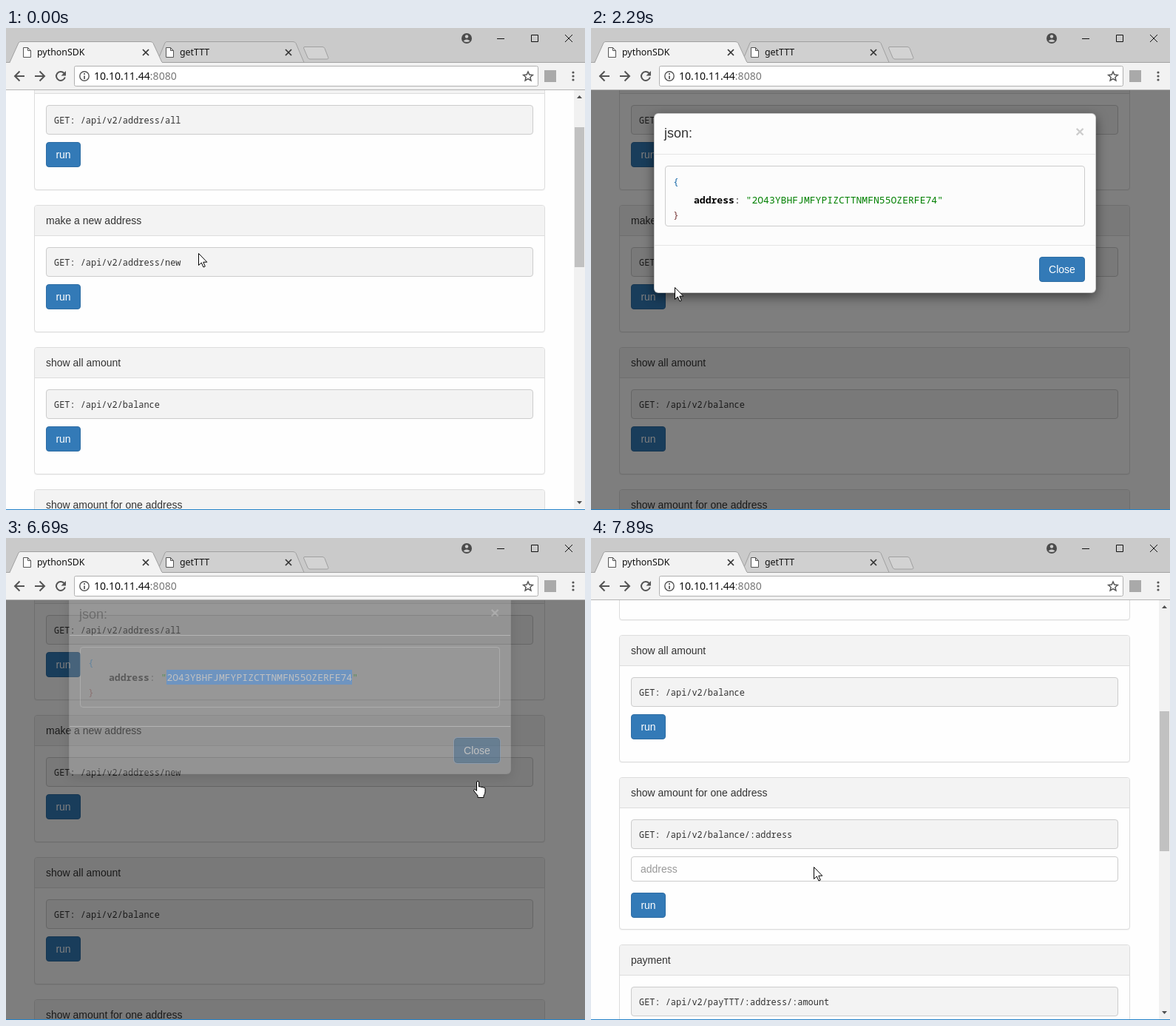
An HTML page for the animation above (8000 ms loop, 783 by 651 pixels).

```html
<!DOCTYPE html>
<html lang="en">
<head>
<meta charset="utf-8">
<title>API console</title>
<style>
* { box-sizing: border-box; }
html, body { margin: 0; width: 783px; height: 651px; overflow: hidden; background: #fefefe; }
body { position: relative; font: 14px/20px "Liberation Sans", Arial, sans-serif; color: #333; }
body > *, .card, .modal > * { position: absolute; }
#page { inset: 0; }
.card { left: 38px; width: 691px; border: 1px solid #ddd; border-radius: 4px; background: #fefefe;
  box-shadow: 0 1px 1px rgba(0,0,0,.05); padding: 0 15px; }
.card h4 { margin: 0 -15px 15px; padding: 10px 15px; height: 41px; font: inherit;
  background: #f3f3f3; border-bottom: 1px solid #ddd; border-radius: 3px 3px 0 0; }
.code { height: 40px; margin-bottom: 10px; padding-left: 10px; border: 1px solid #ccc; border-radius: 4px;
  background: #f3f3f3; font: 11.92px/38px "Noto Sans Mono", monospace; white-space: pre; }
.field { height: 34px; margin-bottom: 15px; padding: 6px 12px; border: 1px solid #ccc; border-radius: 4px; color: #999; }
.btn { width: 47px; height: 34px; line-height: 32px; text-align: center; color: #fff;
  background: #337ab7; border: 1px solid #2e6da4; border-radius: 4px; }
.btn.hover, .btn.focus { background: #286090; border-color: #204d74; }
.btn.focus { outline: 1px solid #7fa9d8; }
#bar { left: 768px; top: 84px; width: 15px; height: 567px; background: #f1f1f1; }
#shade { inset: 84px 0 0; background: #000; }
.modal { left: 85px; top: 115px; width: 598px; height: 243px; border-radius: 6px; --o: 1;
  background: rgba(252,252,252,var(--o)); border: 1px solid rgba(0,0,0,calc(var(--o) * .2));
  box-shadow: 0 5px 15px rgba(0,0,0,calc(var(--o) * .5)); }
.modal > * { opacity: min(1, calc(var(--o) * 2)); }
.modal hr { left: 0; width: 596px; height: 1px; margin: 0; border: 0; background: #e5e5e5; }
#json { left: 14px; top: 70px; width: 568px; height: 82px; margin: 0; padding: 10px; border: 1px solid #ccc;
  border-radius: 4px; font: 13.07px/20px "Noto Sans Mono", monospace; color: #008000; }
#json div { padding-left: 28px; }
#json b { color: #000; }
#json i { font-style: normal; color: #333; }
#picked { display: inline-block; height: 20px; background: #3390ff; color: #fff; }
#menu { left: 459px; top: 228px; width: 420px; height: 112px; padding-top: 2px; background: #fff; border: 1px solid #aaa;
  box-shadow: 4px 3px 3px rgba(0,0,0,.55); font: 12.4px/24px "Noto Sans", sans-serif; color: #111; white-space: nowrap; }
#menu div { padding-left: 25px; height: 24px; }
#menu div:first-child { background: #e6e6e6; }
#menu hr { margin: 4px 0 6px; border: 0; height: 1px; background: #e0e0e0; }
svg { left: 0; top: 0; overflow: visible; }
svg text { font: 12.4px "Noto Sans", sans-serif; fill: #111; }
</style>
</head>
<body>
<div id="page"></div>
<svg id="bar" width="15" height="567"><path fill="#505050" d="M4 11h7l-3.5-4zM4 555h7l-3.5 4z"/><rect id="thumb" x="1" width="13" height="189" fill="#c1c1c1"/></svg>
<div id="shade"></div>
<div class="modal" id="modal">
  <div style="left:13px;top:16px;font-size:18px">json:</div>
  <div style="left:569px;top:13px;font:bold 21px/21px 'Liberation Sans',sans-serif;color:#ccc">×</div>
  <hr style="top:54px">
  <div id="json"><span style="color:#1a6aa8">{</span><div><b>address</b><i>: </i>"<span id="picked"></span><span id="rest"></span>"</div><span style="color:#7a3b3b">}</span></div>
  <hr style="top:177px">
  <div class="btn" id="close" style="left:520px;top:193px;width:62px">Close</div>
</div>
<svg width="783" height="84" fill="none" stroke-width="1">
  <path fill="#cacaca" d="M0 0h783v84H0z"/>
  <path fill="#f2f2f2" d="M0 47h783v36H0z"/>
  <path stroke="#a3a3a3" d="M0 46.5H783"/>
  <path stroke="#b4b4b4" d="M0 83.5H783"/>
  <path fill="#d0d0d0" stroke="#a0a0a0" d="M204 46.5L215 20q1-1.500 3-1.500H388q3 0 4 2L403 46.500z"/>
  <path fill="#f2f2f2" stroke="#a0a0a0" d="M5 46.500L17 20q1-1.500 3-1.500H195q3 0 4 2L211 46.500"/>
  <path fill="#f2f2f2" d="M6 46h205v2H5z"/>
  <path fill="#d3d3d3" stroke="#a0a0a0" d="M404 25.500H428q2 0 3 2l5 13q0 1.500-2 1.500H411q-2 0-3-2l-5.500-13q0-1.500 1.500-1.500z"/>
  <g stroke="#555" fill="#fff"><path id="doc" d="M23.500 26.500h6l4 4v9h-10zM29.500 26.500v4h4"/><use href="#doc" x="193"/></g>
  <g stroke="#333" stroke-width="1.700"><path id="x" d="M185 29l8 8m0-8l-8 8"/><use href="#x" x="193"/></g>
  <text x="42" y="37">pythonSDK</text><text x="235" y="37">getTTT</text>
  <circle cx="623" cy="14" r="7" fill="#4b4b4b"/><circle cx="623" cy="11.500" r="2.200" fill="#ccc"/>
  <path fill="#ccc" d="M618.500 17.500q4.500-4 9 0q-4.500 3-9 0"/>
  <path stroke="#111" d="M664 14.500h10M710.500 9.500h9v9h-9zM756 9l10 10m0-10l-10 10"/>
  <rect x="92.500" y="51.500" width="627" height="27" rx="2" fill="#fff" stroke="#b0b0b0"/>
  <g stroke="#555" stroke-width="2">
    <path d="M25 65H12m6.500-6.500L12 65l6.500 6.500M39 65H52m-6.500-6.500L52 65l-6.500 6.500M78.500 61a6 6 0 1 0 1.300 5.500"/>
    <path fill="#555" stroke="none" d="M81 58v6.500h-6.500z"/>
    <circle cx="106" cy="65" r="6.200" stroke-width="1.400"/>
    <path d="M106 61v2m0 1.500v4.500" stroke-width="1.700"/>
    <path stroke-width="1.500" d="M706 59l1.800 4.100 4.500.4-3.400 3 1 4.400-3.900-2.300-3.900 2.300 1-4.400-3.400-3 4.500-.4z"/>
  </g>
  <text x="119" y="70" style="font-size:14.100px">10.10.11.44<tspan fill="#777">:8080</tspan></text>
  <path fill="#a9a9a9" d="M728 57h16v16h-16z"/>
  <g fill="#555"><circle cx="767" cy="60" r="1.600"/><circle cx="767" cy="65" r="1.600"/><circle cx="767" cy="70" r="1.600"/></g>
</svg>
<div style="left:0;top:650px;width:783px;height:1px;background:#2382c8"></div>
<div id="menu"><div>Copy</div><div id="search"></div><div>Print...</div><hr><div>Inspect</div></div>
<svg width="1" height="1"><path id="cursor" stroke="#000"/></svg>
<script>
const $ = id => document.getElementById(id);
const LOOP = 8000, ADDRESS = '2O43YBHFJMFYPIZCTTNMFN55OZERFE74';

const cards = [
  [47, 172, 'show all addresses', 'address/all'],
  [239, 172, 'make a new address', 'address/new'],
  [431, 172, 'show all amount', 'balance'],
  [623, 206, 'show amount for one address', 'balance/:address', 'address'],
  [849, 255, 'payment', 'payTTT/:address/:amount', 'address'],
];
$('page').innerHTML = cards.map(([top, height, title, path, field]) => `
  <div class="card" style="top:${top}px;height:${height}px"><h4>${title}</h4>
  <div class="code">GET: /api/v2/${path}</div>
  ${field ? `<div class="field">${field}</div>` : ''}<div class="btn">run</div></div>`).join('');
const run = document.querySelectorAll('#page .btn')[1];
$('search').textContent = `Search Quelvo for “${ADDRESS}”`;

const shapes = {
  arrow: ['M.5 .5V16.500L4.300 13 7 19 9.300 18 6.800 12.200H11.800Z', '#fff'],
  hand: ['M-1.500 13V2a1.500 1.500 0 0 1 3 0V8q1.500-1 3 .5 1.500-.8 3 .6 2.500-.8 2.500 1.600V15q-.2 3-2 5V22.500H0V20L-5 14q-1-2 .5-2.500 1.500 0 3 2Z', '#fff'],
  beam: ['M0 .5H3M4 .5H7M3.500 1V15M0 15.500H3M4 15.500H7', 'none'],
};

// Step tracks: each entry holds from its time until the next one.
const kinds = [[0, 'arrow'], [1480, 'hand'], [1870, 'arrow'], [2830, 'beam'], [5400, 'arrow'], [6300, 'hand'], [6960, 'arrow']];
const moves = [
  [0, 260, 304], [1090, 228, 318], [1210, 155, 350], [1330, 110, 368], [1480, 90, 369], [1600, 82, 368],
  [2290, 113, 350], [2410, 185, 300], [2530, 234, 262], [2680, 224, 239], [2830, 222, 228], [2950, 219, 221],
  [3350, 217, 221], [3600, 218, 221], [3750, 334, 218], [3900, 410, 215], [4020, 460, 213], [4140, 475, 213],
  [4420, 474, 213], [4570, 469, 220], [4970, 457, 220], [5400, 475, 237], [5520, 479, 240], [5640, 481, 242],
  [5910, 488, 243], [6030, 514, 249], [6180, 595, 300], [6300, 638, 328],
  [6960, 580, 358], [7080, 450, 400], [7200, 340, 435], [7320, 301, 444],
];
const shades = [[0, 0], [1750, .12], [1870, .335], [2020, .5], [6960, .4], [7080, .25], [7200, .1], [7320, 0]];
const modals = [[0, 0, -61], [2020, .35, -30], [2140, .95, -3], [2290, 1, 0], [6450, .9, -3], [6570, .55, -20], [6690, .2, -39], [6810, 0, -61]];
const picks = [[0, 0], [3750, 15], [3900, 25], [4020, 31], [4140, 32]];
const scrolls = [[0, 0], [7470, 6], [7620, 100], [7740, 210], [7890, 300]];
const at = (track, t) => track.findLast(([start]) => start <= t).slice(1);

function draw(now) {
  const t = now % LOOP, within = (a, b) => t >= a && t < b;
  const [x, y] = at(moves, t), [d, fill] = shapes[at(kinds, t)[0]];
  const cursor = $('cursor');
  cursor.setAttribute('d', d);
  cursor.setAttribute('fill', fill);
  cursor.setAttribute('transform', `translate(${x} ${y})`);

  const [scroll] = at(scrolls, t);
  $('page').style.transform = `translateY(${-scroll}px)`;
  $('thumb').setAttribute('y', 50 + Math.round(scroll / 3));
  $('bar').style.visibility = within(1750, 7320) ? 'hidden' : 'visible';
  $('shade').style.opacity = at(shades, t)[0];

  const [opacity, shift] = at(modals, t), modal = $('modal').style;
  modal.visibility = opacity ? 'visible' : 'hidden';
  modal.setProperty('--o', opacity);
  modal.transform = `translateY(${shift}px)`;
  const [picked] = at(picks, t);
  $('picked').textContent = ADDRESS.slice(0, picked);
  $('rest').textContent = ADDRESS.slice(picked);
  $('menu').style.visibility = within(5400, 5790) ? 'visible' : 'hidden';

  run.classList.toggle('hover', within(1480, 1750));
  run.classList.toggle('focus', within(1750, 2290));
  $('close').classList.toggle('hover', within(6300, 6450));
  $('close').classList.toggle('focus', t >= 6450);
  requestAnimationFrame(() => draw(performance.now() - begin));
}
const begin = performance.now();
draw(0);
</script>
</body>
</html>
```
